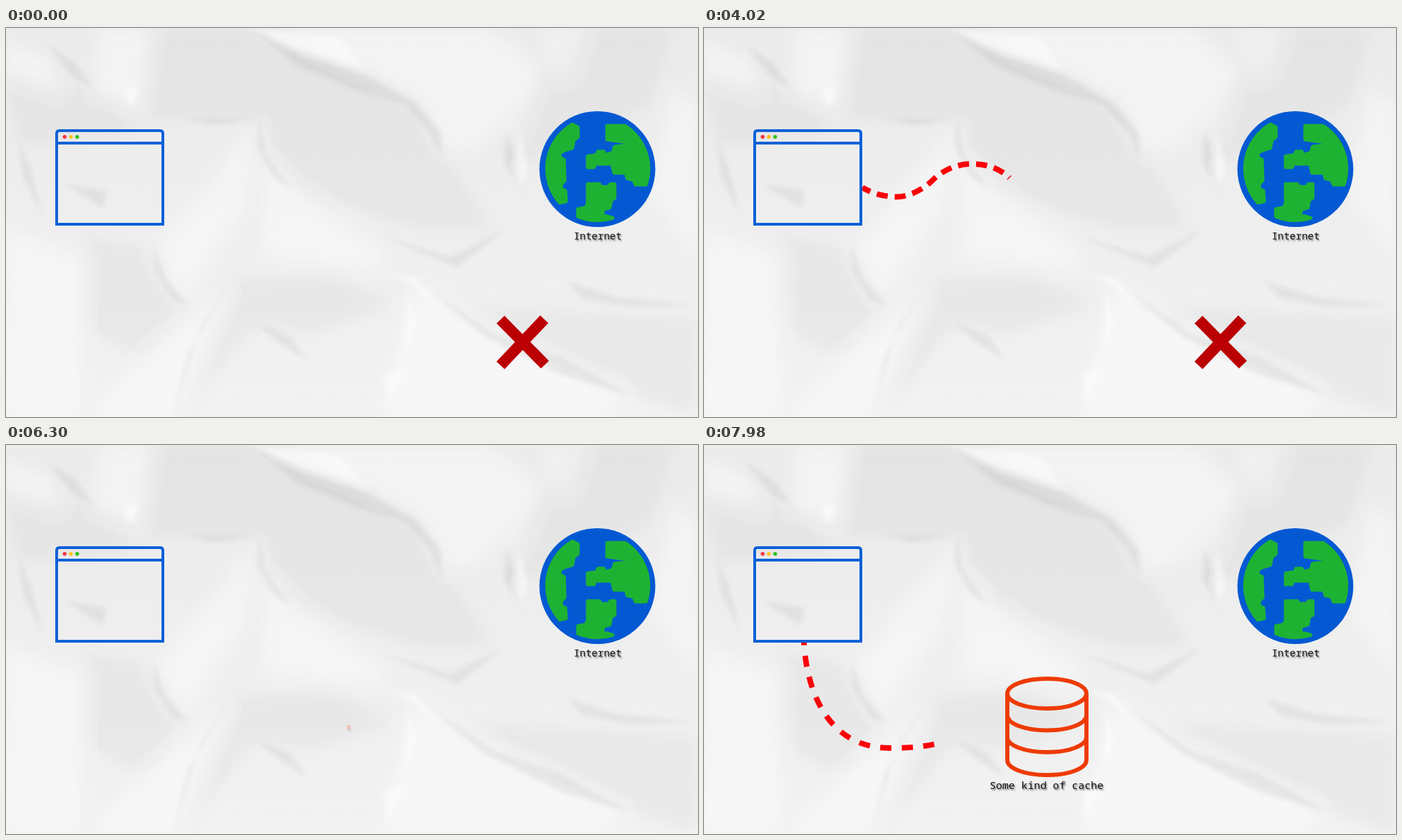
Write an HTML page that moves like this. It is 997x561 px and loops after 8 s.

```html
<!DOCTYPE html>
<html lang="en">
<head>
<meta charset="utf-8">
<title>Browser, internet and cache</title>
<style>
  html, body { margin: 0; width: 100%; height: 100%; overflow: hidden; background: #f1f1f1; }
  svg { display: block; width: 997px; height: 561px; }
  .dark { fill: #000; }
  .light { fill: #fff; }
  .route { fill: none; stroke: #f90208; stroke-width: 8; }
  .reveal { fill: none; stroke: #fff; stroke-width: 10; }
  .land { fill: #1eb233; stroke: #1eb233; stroke-width: 5; stroke-linejoin: round; }
  .label {
    font-family: "Noto Sans Mono", "DejaVu Sans Mono", monospace;
    text-anchor: middle; fill: #111;
    text-shadow: 1.5px 2px 2px rgba(0, 0, 0, .5);
  }
</style>
</head>
<body>
<svg viewBox="0 0 997 561">
  <defs>
    <filter id="soft" filterUnits="userSpaceOnUse" x="-60" y="-60" width="1117" height="681"><feGaussianBlur stdDeviation="11"/></filter>
    <filter id="crease" filterUnits="userSpaceOnUse" x="-60" y="-60" width="1117" height="681"><feGaussianBlur stdDeviation="3"/></filter>
    <linearGradient id="paper" x2="0" y2="1">
      <stop offset="0" stop-color="#ebebeb"/>
      <stop offset=".45" stop-color="#eeeeee"/>
      <stop offset="1" stop-color="#f2f2f2"/>
    </linearGradient>
    <mask id="maskA" maskUnits="userSpaceOnUse" x="0" y="0" width="997" height="561"><path class="reveal" id="revealA"/></mask>
    <mask id="maskB" maskUnits="userSpaceOnUse" x="0" y="0" width="997" height="561"><path class="reveal" id="revealB"/></mask>
  </defs>

  <!-- crumpled paper -->
  <rect width="997" height="561" fill="url(#paper)"/>
  <g filter="url(#soft)">
    <g class="dark" opacity=".032">
      <path d="M205 0H355L600 110L630 190L480 170L360 130L200 130Z"/>
      <path d="M362 135L500 110L630 180L700 290L600 290L420 235Z"/>
      <path d="M0 70L130 90L190 150L20 170Z"/>
      <path d="M325 365L470 350L560 400L440 440L360 430L250 561Z"/>
      <path d="M640 400L997 420V561L890 525Z"/>
      <path d="M690 150L760 90L800 0H960L930 110L740 200Z"/>
      <path d="M110 300L215 320L260 400L200 480L110 430Z"/>
    </g>
    <g class="light" opacity=".42">
      <path d="M132 0H208L192 110L130 90Z"/>
      <path d="M362 140L345 260L255 390L215 320L290 230Z"/>
      <path d="M390 0H700L770 60L740 150L640 180L600 105L520 60Z"/>
      <path d="M370 190L420 235L540 320L540 350L370 330Z"/>
      <path d="M0 290L110 330L105 561H0Z"/>
      <path d="M320 375L240 561H120L200 480Z"/>
      <path d="M780 0H835L810 70L780 65Z"/>
      <path d="M960 90L997 110V330L930 240Z"/>
      <path d="M590 365L700 440L890 530L860 561H540Z"/>
      <path d="M0 20L60 45L80 95L0 65Z"/>
    </g>
  </g>
  <g filter="url(#crease)">
    <g class="dark" opacity=".055">
      <path d="M355 0L430 38L520 68L590 108L626 150L628 190L610 150L575 112L500 88L420 55Z"/>
      <path d="M60 25L100 50L127 88L95 70Z"/>
      <path d="M18 165L35 200L52 270L25 215Z"/>
      <path d="M365 130L372 180L410 232L385 215L362 170Z"/>
      <path d="M260 130L365 130L300 140Z"/>
      <path d="M212 310L228 360L262 400L240 392L215 350Z"/>
      <path d="M322 368L280 430L240 561L262 470Z"/>
      <path d="M600 370L700 440L800 475L900 530L800 500L690 445Z"/>
      <path d="M722 150L735 190L745 240L718 195Z"/>
      <path d="M808 365L880 388L997 400L900 402L830 390Z"/>
      <path d="M540 300L640 330L720 290L650 345Z"/>
      <path d="M360 425L410 445L435 480L395 455Z"/>
      <path d="M85 225L145 235L140 260Z"/>
    </g>
    <g class="light" opacity=".5">
      <path d="M350 0L480 15L520 60L430 34Z"/>
      <path d="M172 88L190 85L186 112L174 110Z"/>
      <path d="M550 352L590 360L625 400L585 370Z"/>
      <path d="M740 150L752 200L740 235L733 200Z"/>
      <path d="M580 370L590 430L575 470Z"/>
      <path d="M545 500L575 490L550 540Z"/>
    </g>
  </g>

  <g id="search">
    <path class="route" id="routeA" mask="url(#maskA)" stroke-dasharray="16 10" stroke-dashoffset="3"/>
    <path d="M712.5 420.5L776.5 485.5M775.5 420L712.5 486.500" stroke="#bb0003" stroke-width="16"/>
  </g>
  <path class="route" id="routeB" mask="url(#maskB)" stroke-dasharray="16 15" stroke-dashoffset="11"/>

  <!-- browser window -->
  <g fill="none" stroke="#0660d8" stroke-width="4">
    <path d="M73 283V152Q73 148 77 148H222Q226 148 226 152V283Z"/>
    <path d="M73 166H226"/>
  </g>
  <circle cx="84.500" cy="157" r="2.800" fill="#f23545"/>
  <circle cx="93.500" cy="157" r="2.800" fill="#fcc41c"/>
  <circle cx="102.500" cy="157" r="2.800" fill="#2fc01c"/>

  <!-- globe -->
  <circle cx="852" cy="203.500" r="83.500" fill="#0459d3"/>
  <g class="land">
    <path d="M816 139L824 143V157L818 162L816 173L806 176L798 180V187L804 190L805 220L800 225V232L806 235L807 250L798 252A74 74 0 0 1 816 139Z"/>
    <path d="M866 141H892A74 74 0 0 1 922 226H907L904 219L895 217L893 209H876L873 196H849L847 201H838V185L851 183L853 178H861L863 183L874 180L877 171L896 169V165L866 161Z"/>
    <path d="M838 225H855L857 229H868L871 225H877V245L872 248L870 259L860 262V270L874 274A74 74 0 0 1 824 272V261L835 259L838 253Z"/>
  </g>
  <text class="label" x="852.500" y="305" font-size="14.400">Internet</text>

  <!-- cache -->
  <g id="cache">
    <g fill="none" stroke="#ee3b04" stroke-width="6">
      <ellipse cx="494" cy="358.500" rx="57" ry="21.500"/>
      <path d="M437 358.500V454.500A57 21.500 0 0 0 551 454.500V358.500"/>
      <path d="M437 390A57 21.500 0 0 0 551 390M437 421.500A57 21.500 0 0 0 551 421.500"/>
    </g>
    <text class="label" x="493.500" y="496" font-size="15.200">Some kind of cache</text>
  </g>
</svg>
<script>
  const LOOP = 8000, STEP = 60, CUT = 6300;
  const $ = id => document.getElementById(id);

  // Each piece of a route ends where the pen is at the matching time.
  const routes = {
    A: {
      times: [3540, 4020, 5520, 6000],
      pieces: [
        'M228 230C243 239 261 243.5 278 243.5S316 233 330 219S364 196 386 196S427 203 440 216',
        'C448 224 452 233 452 243C452 258 434 275 434 305C434 335 452 352 474 352' +
        'C500 352 519 340 519 322S509 290 495 290S475 308 475 330C475 372 490 400 512 400' +
        'C540 400 564 376 580 345C603 300 620 222 662 222C684 222 697 242 697 265' +
        'C697 300 660 315 628 338',
        'C600 358 588 384 592 408C597 440 660 453 745 452'
      ]
    },
    B: {
      times: [7440, 7980],
      pieces: ['M144 284C146 330 165 437 268 437C290 437 312 436 335 431']
    }
  };

  for (const [key, r] of Object.entries(routes)) {
    r.pen = $('reveal' + key);
    r.lengths = [0];
    let d = '';
    for (const piece of r.pieces) {
      r.pen.setAttribute('d', d += piece);
      r.lengths.push(r.pen.getTotalLength());
    }
    $('route' + key).setAttribute('d', d);
  }

  const clamp = x => Math.min(1, Math.max(0, x));
  const smooth = x => x * x * (3 - 2 * x);
  const show = (el, on) => { el.style.display = on ? '' : 'none'; };

  function drawn({ times, lengths }, t) {
    let len = 0;
    for (let i = 1; i < times.length; i++) {
      const k = clamp((t - times[i - 1]) / (times[i] - times[i - 1]));
      len += k * (lengths[i] - lengths[i - 1]);
    }
    return len;
  }

  function render(now) {
    const t = Math.floor(now % LOOP / STEP) * STEP;
    for (const r of Object.values(routes)) {
      const len = drawn(r, t);
      show(r.pen, len > 0);
      r.pen.setAttribute('stroke-dasharray', `${len} 9999`);
    }
    show($('search'), t < CUT);
    show($('cache'), t >= CUT);
    const s = smooth(clamp((t - CUT + STEP) / 500));
    $('cache').setAttribute('transform', `translate(494 407) scale(${s}) translate(-494 -407)`);
  }

  const start = performance.now();
  (function tick() {
    render(performance.now() - start);
    requestAnimationFrame(tick);
  })();
</script>
</body>
</html>
```
